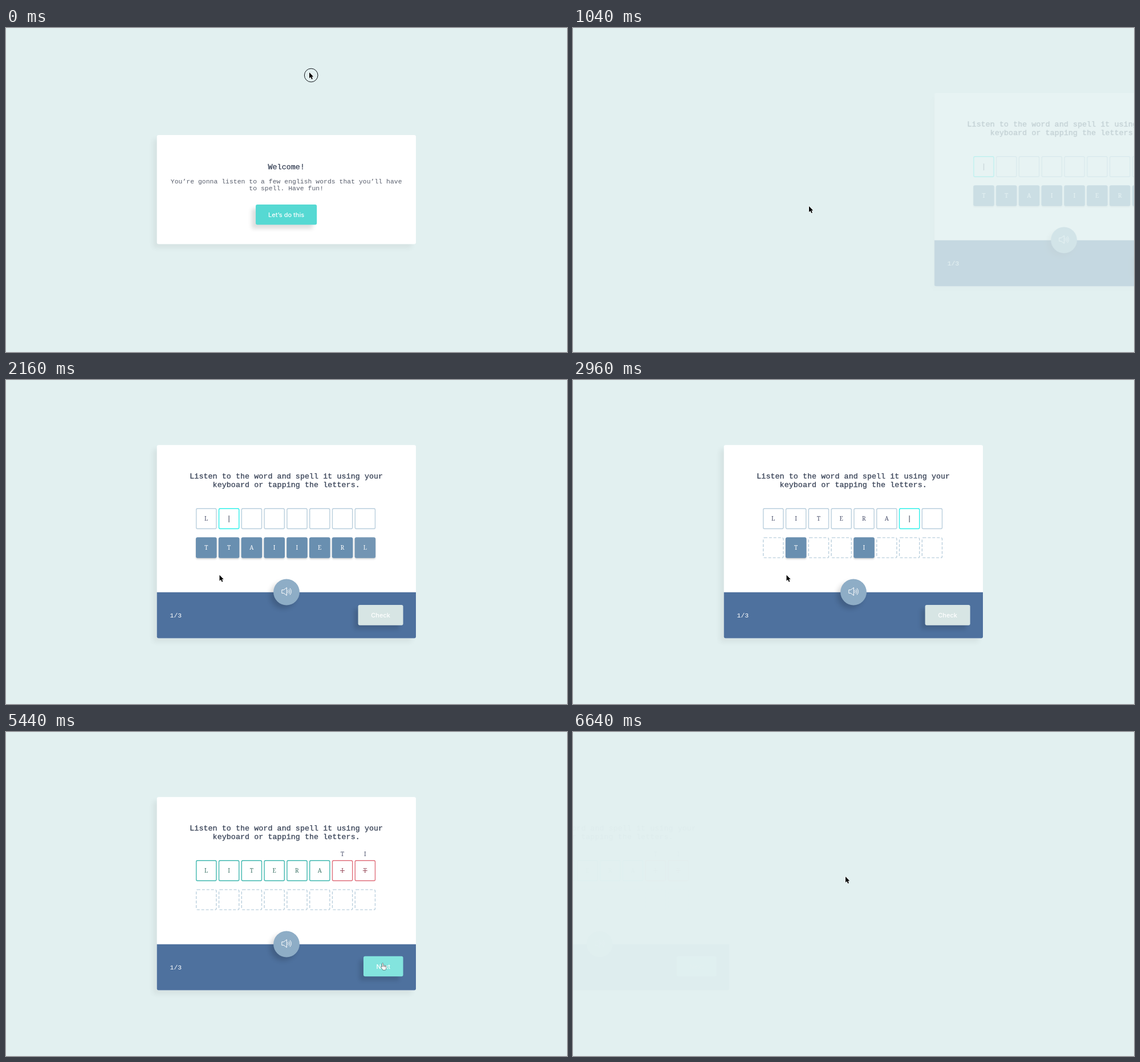
Animation of 984 by 569 pixels, one loop 6720 ms. Source, as an HTML page with a canvas:

```html
<!DOCTYPE html>
<html lang="en">
<head>
<meta charset="utf-8">
<title>Spelling game</title>
<style>
  html, body { margin: 0; width: 100%; height: 100%; overflow: hidden; background: #e2f0f0; }
  canvas { display: block; }
</style>
</head>
<body>
<canvas id="stage" width="984" height="569"></canvas>
<script>
const W = 984, H = 569, LOOP = 6720, STEP = 80;
const stage = document.getElementById('stage').getContext('2d');
const layer = document.createElement('canvas');
layer.width = W;
layer.height = H;
const g = layer.getContext('2d');

const MONO = '"Liberation Mono", monospace';
const SLAB = '"Noto Serif", serif';
const SANS = 'Inter, "Liberation Sans", sans-serif';
const CARD_X = 264.7, CARD_W = 454.3;

const WHITE = [255, 255, 255], INK = [74, 80, 108], LINE = [186, 207, 221];
const CYAN = [48, 240, 234], TEAL = [86, 217, 211], TEAL_LIGHT = [131, 228, 222];
const MUTED = [215, 229, 228], GREEN = [65, 184, 176], RED = [224, 112, 124];
const GREEN_INK = [63, 116, 104], RED_INK = [150, 72, 88];

const TILES = 'TTAIIERL';
const ANSWER = 'LITERATI';
// letter typed, tile it uses, time
const KEYS = [
  ['L', 7, 2128], ['I', 3, 2263], ['T', 0, 2398], ['E', 5, 2534],
  ['R', 6, 2670], ['A', 2, 2805], ['I', 4, 4270], ['T', 1, 4430]
];
const LEAVE_1 = 390, ENTER = 890, CHECKED = 4960, LEAVE_2 = 6199, SLIDE = 490;

// time, x, y of the pointer tip
const PATH = [
  [0, 532, 78], [320, 500, 326], [560, 495, 326], [1040, 414, 313], [1520, 374.5, 342.5],
  [4400, 374.5, 342.5], [4740, 639, 401], [4900, 656, 408], [5200, 656, 408],
  [5680, 664, 404], [5880, 664, 404], [6240, 661, 426.5], [6640, 478, 254], [6720, 478, 254]
];

const clamp = v => Math.max(0, Math.min(1, v));
const rgb = c => `rgb(${c.map(Math.round).join()})`;
const mix = (a, b, p) => a.map((v, i) => v + (b[i] - v) * p);

// cubic-bezier(.42, 0, .58, 1)
function ease(x) {
  if (x <= 0 || x >= 1) return clamp(x);
  let lo = 0, hi = 1, u = 0.5;
  for (let i = 0; i < 18; i++) {
    u = (lo + hi) / 2;
    const v = 1 - u;
    if (1.26 * u * v * v + 1.74 * u * u * v + u * u * u < x) lo = u; else hi = u;
  }
  return u * u * (3 - 2 * u);
}
const during = (t, start, length) => ease((t - start) / length);

function shadow(dx, dy, blur, alpha) {
  g.shadowOffsetX = dx;
  g.shadowOffsetY = dy;
  g.shadowBlur = blur;
  g.shadowColor = `rgba(0,0,0,${alpha})`;
}
const noShadow = () => shadow(0, 0, 0, 0);

function box(x, y, w, h, r, color) {
  g.beginPath();
  g.roundRect(x, y, w, h, r);
  g.fillStyle = rgb(color);
  g.fill();
}

function frame(x, y, w, h, color, dash = []) {
  g.beginPath();
  g.roundRect(x + 0.7, y + 0.7, w - 1.4, h - 1.4, 2.2);
  g.setLineDash(dash);
  g.lineWidth = 1.4;
  g.strokeStyle = rgb(color);
  g.stroke();
  g.setLineDash([]);
}

function text(str, x, y, font, color, align = 'center', spacing = 0, bold = 0) {
  g.font = font;
  g.textAlign = align;
  g.letterSpacing = spacing + 'px';
  g.fillStyle = g.strokeStyle = rgb(color);
  g.fillText(str, x, y);
  if (bold) {
    g.lineWidth = bold;
    g.strokeText(str, x, y);
  }
  g.letterSpacing = '0px';
}
const title = (str, y) => text(str, 491.7, y, '13.3px ' + MONO, [60, 70, 90], 'center', 0.09, 0.35);
const body = (str, x, y, color, align) => text(str, x, y, '11.35px ' + MONO, color, align, 0.07);
const letter = (ch, x, y, color) => text(ch, x, y, '10px ' + SLAB, color);

function button(label, x, y, w, color, lift) {
  shadow(-7, 7, 7, 0.13);
  box(x, y - 1.4 * lift, w, 35.6, 3, color);
  noShadow();
  text(label, x + w / 2, y + 22 - 1.4 * lift, '500 11px ' + SANS, WHITE);
}

function card(y, h) {
  shadow(-7, 7, 8, 0.055);
  box(CARD_X, y, CARD_W, h, 3, WHITE);
  noShadow();
}

function welcome(t) {
  card(188, 191.6);
  title('Welcome!', 248);
  body('You’re gonna listen to a few english words that you’ll have', 491.7, 273, [88, 94, 108]);
  body('to spell. Have fun!', 491.7, 285, [88, 94, 108]);
  const over = during(t, 270, 180);
  button('Let’s do this', 438, 310, 107.2, mix(TEAL, TEAL_LIGHT, over), over);
}

function speaker() {
  shadow(-6, 6, 8, 0.16);
  g.beginPath();
  g.arc(492, 372.5, 22.9, 0, 7);
  g.fillStyle = '#8eadc6';
  g.fill();
  noShadow();
  g.strokeStyle = '#fff';
  g.lineWidth = 1;
  g.lineJoin = 'round';
  g.beginPath();
  g.moveTo(483.8, 368.6);
  g.lineTo(487.2, 368.6);
  g.lineTo(492.4, 364.6);
  g.lineTo(492.4, 378.4);
  g.lineTo(487.2, 374.4);
  g.lineTo(483.8, 374.4);
  g.closePath();
  g.stroke();
  for (const r of [3.3, 5.9, 8.5]) {
    g.beginPath();
    g.arc(491.8, 371.5, r, -0.75, 0.75);
    g.stroke();
  }
}

function cells(t) {
  const typed = KEYS.filter(k => k[2] <= t).length;
  const focus = Math.min(typed, 7);
  const done = during(t, CHECKED, 240);
  for (let i = 0; i < 8; i++) {
    const x = 333 + 39.8 * i, mid = x + 18.2;
    const ok = KEYS[i][0] === ANSWER[i];
    const edge = i === focus ? CYAN : LINE;
    frame(x, 225, 36.6, 37, mix(edge, ok ? GREEN : RED, done));
    if (i < typed) letter(KEYS[i][0], mid, 246.7, mix(INK, ok ? GREEN_INK : RED_INK, done));
    if (!ok && done > 0) {
      g.globalAlpha = done;
      box(mid - 4, 242.9, 8, 1, 0, RED_INK);
      letter(ANSWER[i], mid, 217.6, INK);
      g.globalAlpha = 1;
    }
  }
  if (typed < 8) {
    const since = typed ? Math.ceil(KEYS[typed - 1][2] / STEP) * STEP : 960;
    const off = Math.floor(Math.max(0, t - since) / 240) % 2;
    if (!off) box(351 + 39.8 * focus - 0.2, 238, 1, 12, 0, [50, 58, 80]);
  }
}

function tiles(t) {
  for (let i = 0; i < 8; i++) {
    const x = 333 + 39.8 * i;
    const used = during(t, KEYS.find(k => k[1] === i)[2], 150);
    if (used > 0) {
      g.globalAlpha = used;
      frame(x, 276.2, 36.6, 36.6, LINE, [5, 2.9]);
    }
    if (used < 1) {
      g.globalAlpha = 1 - used;
      shadow(0, 2, 3, 0.17);
      box(x, 276.2, 36.6, 36.6, 3, [105, 143, 176]);
      noShadow();
      letter(TILES[i], x + 18.2, 297.6, WHITE);
    }
    g.globalAlpha = 1;
  }
}

function game(t) {
  card(114.2, 339.3);
  title('Listen to the word and spell it using your', 173);
  title('keyboard or tapping the letters.', 188);
  cells(t);
  tiles(t);
  box(CARD_X, 372.8, CARD_W, 80.7, [0, 0, 3, 3], [78, 113, 158]);
  speaker();
  body('1/3', 287.5, 416.8, WHITE, 'left');
  const over = during(t, 4730, 200);
  const color = mix(mix(MUTED, TEAL, during(t, KEYS[7][2], 200)), TEAL_LIGHT, over);
  if (t < CHECKED) button('Check', 617.6, 395.1, 79, color, over);
  else button('Next', 627, 395.1, 69.6, color, over);
}

function show(draw, t, dx, alpha) {
  g.clearRect(0, 0, W, H);
  draw(t);
  stage.globalAlpha = alpha;
  stage.drawImage(layer, dx, 0);
  stage.globalAlpha = 1;
}

function pointerAt(t) {
  const i = PATH.findIndex(p => p[0] > t);
  const a = PATH[i - 1], b = PATH[i];
  const p = ease((t - a[0]) / (b[0] - a[0]));
  return [a[1] + (b[1] - a[1]) * p, a[2] + (b[2] - a[2]) * p];
}

const ARROW = new Path2D('M0 0V10.2L2.4 8.1L4.1 12L5.9 11.2L4.2 7.4H7.2Z');
const HAND = new Path2D('M2.2 .9C2.4 -.3 3.9 -.2 4 .9V4.2C4.6 3.5 5.7 3.7 5.9 4.5C6.5 4 7.4 4.2 7.6 5' +
  'C8.4 4.7 9 5.2 9 6V8.4C9 9.7 8.3 10.4 8 11.8H3.3C2.9 10.2 1.3 8.9 .4 7.3C-.2 6.2 1 5.7 2.2 7Z');

function pointer(t, dx) {
  const [x, y] = pointerAt(t);
  const inside = (l, top, r, bottom) => x > l + dx && x < r + dx && y > top && y < bottom;
  const hand = t < ENTER ? inside(438, 310, 545, 346)
    : t > KEYS[7][2] && inside(t < CHECKED ? 617.6 : 627, 393, 697, 431);
  stage.save();
  if (t < STEP) {
    stage.beginPath();
    stage.arc(535.2, 83, 11.8, 0, 7);
    stage.lineWidth = 1;
    stage.strokeStyle = '#10141a';
    stage.stroke();
  }
  stage.translate(hand ? x - 2.4 : x, y);
  stage.lineJoin = 'round';
  stage.lineWidth = hand ? 1 : 1.2;
  stage.strokeStyle = hand ? '#111' : 'rgba(255,255,255,.85)';
  stage.fillStyle = hand ? '#fff' : '#000';
  const shape = hand ? HAND : ARROW;
  stage.stroke(shape);
  stage.fill(shape);
  if (hand) {
    stage.lineWidth = 0.6;
    stage.stroke(new Path2D('M4 4.2V6.5M5.9 4.6V6.6M7.6 5.1V6.8'));
  }
  stage.restore();
}

function render(t) {
  stage.fillStyle = '#e2f0f0';
  stage.fillRect(0, 0, W, H);
  let dx = 0;
  if (t < ENTER) {
    const p = during(t, LEAVE_1, SLIDE);
    dx = -CARD_W * p;
    show(welcome, t, dx, 1 - p);
  } else {
    const enter = during(t, ENTER, 500), leave = during(t, LEAVE_2, SLIDE);
    dx = CARD_W * (1 - enter - leave);
    show(game, t, dx, enter - leave);
  }
  pointer(t, dx);
}

const start = performance.now();
function tick() {
  const t = (performance.now() - start) % LOOP;
  render(Math.floor(t / STEP) * STEP);
  requestAnimationFrame(tick);
}
tick();
</script>
</body>
</html>
```
